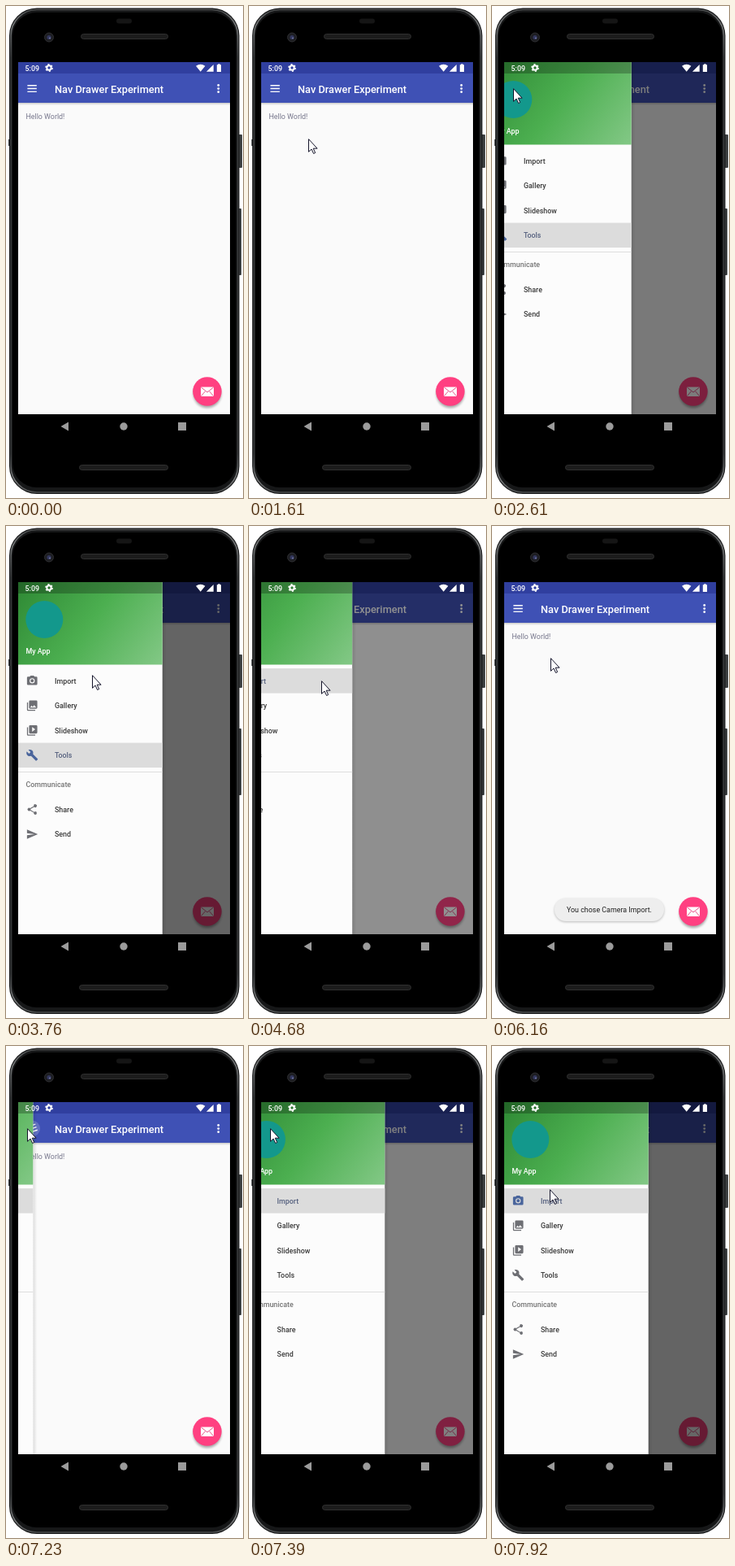
Write an HTML page that moves like this. It is 292x605 px and loops after 8000 ms.

```html
<!DOCTYPE html>
<html lang="en">
<head>
<meta charset="utf-8">
<title>Navigation drawer</title>
<style>
  html, body { margin: 0; width: 100%; height: 100%; overflow: hidden; background: #fff; }
  svg { display: block; }
  text { font: 400 8.89px Roboto, sans-serif; }
  .medium { font-weight: 500; }
  .title { font-size: 12.8px; font-weight: 500; fill: #fff; }
</style>
</head>
<body>
<svg width="292" height="605" viewBox="0 0 292 605">
  <defs>
    <clipPath id="screen"><rect x="15" y="69" width="261" height="433"/></clipPath>
    <linearGradient id="header" gradientUnits="userSpaceOnUse" x1="25" y1="60" x2="182" y2="178">
      <stop stop-color="#2f8a35"/><stop offset=".5" stop-color="#4caf50"/><stop offset="1" stop-color="#81c784"/>
    </linearGradient>
    <linearGradient id="rim" x2="0" y2="1">
      <stop stop-color="#4a4c4d"/><stop offset=".03" stop-color="#77797a"/><stop offset=".1" stop-color="#3a3c3d"/>
      <stop offset=".92" stop-color="#3a3c3d"/><stop offset=".975" stop-color="#77797a"/><stop offset="1" stop-color="#4a4c4d"/>
    </linearGradient>
    <linearGradient id="edge"><stop stop-opacity=".12"/><stop offset="1" stop-opacity="0"/></linearGradient>
    <linearGradient id="below" x2="0" y2="1"><stop stop-opacity=".2"/><stop offset="1" stop-opacity="0"/></linearGradient>
    <filter id="soft" x="-30%" y="-30%" width="160%" height="160%"><feGaussianBlur stdDeviation="1.8"/></filter>
  </defs>

  <g id="phone">
    <g fill="#3c3f40">
      <rect x="286" y="158" width="5" height="41" rx="1"/>
      <rect x="286" y="249" width="4" height="82" rx="1"/>
      <rect x="3" y="164" width="3" height="8"/>
    </g>
    <rect x="4" y="2.5" width="283.5" height="597.5" rx="34" fill="#161718"/>
    <rect x="6" y="4.5" width="279.5" height="593.5" rx="32" fill="none" stroke="url(#rim)" stroke-width="1.6"/>
    <rect x="8" y="8" width="275.5" height="584" rx="30"/>
    <rect x="136" y="15.5" width="19" height="6" rx="3" fill="#151515"/>
    <g fill="#1c1c1c" stroke="#303030">
      <rect x="92.5" y="34.5" width="107" height="6" rx="3"/>
      <rect x="90.5" y="564.5" width="109" height="6" rx="3"/>
    </g>
    <circle cx="53" cy="38.5" r="5.5" fill="#1d1e22" stroke="#2d2d30"/>
    <circle cx="53" cy="38.5" r="2.6" fill="#32365c"/>
    <circle cx="54" cy="39.5" r="1" fill="#7479a5"/>
    <g fill="#9b9b9b">
      <path d="M67.5 517l9.5-5.5v11z"/><circle cx="145" cy="517" r="4.7"/><rect x="212" y="512" width="10" height="10"/>
    </g>
  </g>

  <g clip-path="url(#screen)">
    <rect x="15" y="69" width="261" height="433" fill="#fafafa"/>
    <rect x="15" y="119" width="261" height="3" fill="url(#below)"/>
    <rect x="15" y="83" width="261" height="36" fill="#3f51b5"/>
    <rect x="15" y="69" width="261" height="14" fill="#303f9f"/>
    <circle id="menuRipple" cx="32" cy="101.5" r="10" fill="#fff"/>
    <path id="menu" d="M26.4 97.7h11.4M26.4 101.5h11.4M26.4 105.3h11.4" stroke="#fff" stroke-width="1.35"/>
    <text class="title" x="60" y="106.5">Nav Drawer Experiment</text>
    <g fill="#fff"><circle cx="261.7" cy="97.5" r="1.4"/><circle cx="261.7" cy="101.6" r="1.4"/><circle cx="261.7" cy="105.7" r="1.4"/></g>
    <text x="24.5" y="139" fill="#77778c">Hello World!</text>

    <circle cx="248" cy="477" r="17.3" opacity=".32" filter="url(#soft)"/>
    <circle cx="247.9" cy="474" r="17.8" fill="#ff4081"/>
    <rect x="240" y="468.5" width="16" height="11.5" rx="1" fill="#fff"/>
    <path d="M240.5 469l7.5 6 7.5-6M240.5 479.5l5-5.8M255.5 479.5l-5-5.8" fill="none" stroke="#e8548a"/>

    <rect id="scrim" x="15" y="69" width="261" height="433"/>

    <g id="drawer">
      <rect x="192.7" y="69" width="5" height="433" fill="url(#edge)"/>
      <rect x="15" y="69" width="177.7" height="433" fill="#fcfcfc"/>
      <rect x="15" y="69" width="177.7" height="101.5" fill="url(#header)"/>
      <rect x="15" y="69" width="177.7" height="14" opacity=".25"/>
      <circle cx="47.3" cy="115" r="23" fill="#13988c"/>
      <text class="medium" x="24.5" y="157" fill="#fff">My App</text>
      <rect id="selected" x="15" width="177.7" height="30.5" fill="#dcdcdc"/>
      <circle id="rowRipple" cx="89" cy="190" r="12" opacity=".12"/>
      <path d="M15 302.5h177.7" stroke="#dedede"/>
      <text class="medium" x="24.5" y="321" fill="#747474">Communicate</text>
    </g>

    <g id="toast">
      <rect x="77" y="459" width="135" height="28" rx="14" opacity=".25" filter="url(#soft)"/>
      <rect x="77" y="457.5" width="135" height="28.5" rx="14" fill="#eee"/>
      <text x="92" y="475" fill-opacity=".87">You chose Camera Import.</text>
    </g>

    <g fill="#fff">
      <text class="medium" x="23.5" y="79.7">5:09</text>
      <circle cx="53" cy="76" r="2.7" fill="none" stroke="#fff" stroke-width="2"/>
      <circle cx="53" cy="76" r="4.1" fill="none" stroke="#fff" stroke-width="1.6" stroke-dasharray="2.1 2.2"/>
      <path d="M234 73.7q5.7-4 11.4 0l-5.7 7.1zM255.7 72v8.8h-8.8zM259.8 72.2h1.4v-1h2.4v1h1.4v8.8h-5.2z"/>
    </g>
  </g>

  <path id="cursor" d="M.5.7v15.6l3.5-3.3 2.6 5.5 2.1-1-2.5-5.3h4.9z" fill="#fff" stroke="#14142a"/>
</svg>

<script>
const LOOP = 8000, FIRST_STEP = 680, STEP = 77;
const DRAWER_WIDTH = 177.7, IMPORT_Y = 190.3, TOOLS_Y = 281.8;
const $ = id => document.getElementById(id);
const clamp = v => Math.min(1, Math.max(0, v));

const items = [
  ['Import', IMPORT_Y, 'M9 2 7.2 4H4a2 2 0 0 0-2 2v12a2 2 0 0 0 2 2h16a2 2 0 0 0 2-2V6a2 2 0 0 0-2-2h-3.2L15 2zM12 17a5 5 0 1 1 0-10 5 5 0 0 1 0 10zM12 8.8a3.2 3.2 0 1 0 0 6.4 3.2 3.2 0 0 0 0-6.4z'],
  ['Gallery', 220.8, 'M22 16V4a2 2 0 0 0-2-2H8a2 2 0 0 0-2 2v12a2 2 0 0 0 2 2h12a2 2 0 0 0 2-2zm-11-4 2 2.7 3-3.7 4 5H8zM2 6v14a2 2 0 0 0 2 2h14v-2H4V6z'],
  ['Slideshow', 251.3, 'M4 6H2v14a2 2 0 0 0 2 2h14v-2H4zM20 2H8a2 2 0 0 0-2 2v12a2 2 0 0 0 2 2h12a2 2 0 0 0 2-2V4a2 2 0 0 0-2-2zm-8 12.5v-9l6 4.5z'],
  ['Tools', TOOLS_Y, 'M22.7 19l-9.1-9.1c.9-2.3.4-5-1.5-6.9-2-2-5-2.4-7.4-1.3L9 6 6 9 1.6 4.7C.4 7.1.9 10.1 2.9 12.1c1.9 1.9 4.6 2.4 6.9 1.5l9.1 9.1c.4.4 1 .4 1.4 0l2.3-2.3c.5-.4.5-1.1.1-1.4z'],
  ['Share', 348.5, 'M18 16.1c-.8 0-1.4.3-2 .8l-7.1-4.2a3 3 0 0 0 0-1.4L16 7.2a3 3 0 1 0-1-2.2c0 .2 0 .5.1.7L8 9.8a3 3 0 1 0 0 4.4l7.1 4.2a3 3 0 1 0 2.9-2.3z'],
  ['Send', 379, 'M2 21 23 12 2 3v7l15 2-15 2z'],
];

function add(parent, tag, attrs, text = '') {
  const el = document.createElementNS('http://www.w3.org/2000/svg', tag);
  for (const name in attrs) el.setAttribute(name, attrs[name]);
  el.textContent = text;
  return parent.appendChild(el);
}

const rows = items.map(([label, y, d]) => ({
  y,
  icon: add($('drawer'), 'path', { d, 'fill-rule': 'evenodd', transform: `translate(24.6 ${y - 7.6}) scale(.635)` }),
  label: add($('drawer'), 'text', { class: 'medium', x: 60, y: y + 3.2 }, label),
}));

// Pointer path: time, x, y
const path = [
  [1219, 284, 338], [1373, 172, 258], [1604, 73, 163], [1758, 49, 134], [1989, 31, 109], [2143, 26, 101],
  [2990, 26, 101], [3375, 66, 139], [3760, 106, 183], [3837, 106, 188], [4068, 95, 197], [4299, 89, 190],
  [5850, 89, 190], [6686, 40, 111], [6917, 26, 101], [7535, 26, 101], [7918, 71, 176],
];

function pointerAt(t) {
  if (t < path[0][0]) return [289, 589];
  const next = path.findIndex(p => p[0] > t);
  if (next < 0) return path[path.length - 1].slice(1);
  const [t0, x0, y0] = path[next - 1], [t1, x1, y1] = path[next];
  const f = (t - t0) / (t1 - t0);
  return [Math.round(x0 + (x1 - x0) * f), Math.round(y0 + (y1 - y0) * f)];
}

const settle = ms => 1 - (1 - clamp(ms / 512)) ** 5;
const openness = t => settle(t - 2427) - settle(t - 4639) + settle(t - 7214);
const ripple = (t, start) => t < start ? 0 : clamp(1 - (t - start) / 330) * .25;

function render(now) {
  const k = Math.floor((now - FIRST_STEP + 5) / STEP);
  const t = k < 0 ? 0 : FIRST_STEP + k * STEP;
  const open = openness(t);

  $('drawer').setAttribute('transform', `translate(${(open - 1) * DRAWER_WIDTH} 0)`);
  $('drawer').style.display = open > .002 ? '' : 'none';
  $('scrim').setAttribute('opacity', .6 * openness(t - 12));
  $('menu').setAttribute('transform', `rotate(${-180 * open} 32 101.5)`);
  $('menuRipple').setAttribute('opacity', Math.max(ripple(t, 2370), ripple(t, 7140)));
  $('rowRipple').style.display = t > 4500 && t < 4639 ? '' : 'none';

  const selectedY = t < 4639 ? TOOLS_Y : IMPORT_Y;
  $('selected').setAttribute('y', selectedY - 15.2);
  for (const row of rows) {
    const on = row.y === selectedY;
    row.icon.setAttribute('fill', on ? '#4a659c' : '#6e6f74');
    row.label.setAttribute('fill', on ? '#56617f' : '#3a3a3a');
  }

  $('toast').setAttribute('opacity', clamp((t - 4740) / 400) - clamp((t - 6750) / 400));

  const [x, y] = pointerAt(t);
  $('cursor').setAttribute('transform', `translate(${x} ${y})`);
  $('cursor').style.display = t < FIRST_STEP || (t > 740 && t < 1200) ? 'none' : '';
}

const start = performance.now();
function tick() {
  render((performance.now() - start) % LOOP);
  requestAnimationFrame(tick);
}
tick();
</script>
</body>
</html>
```
